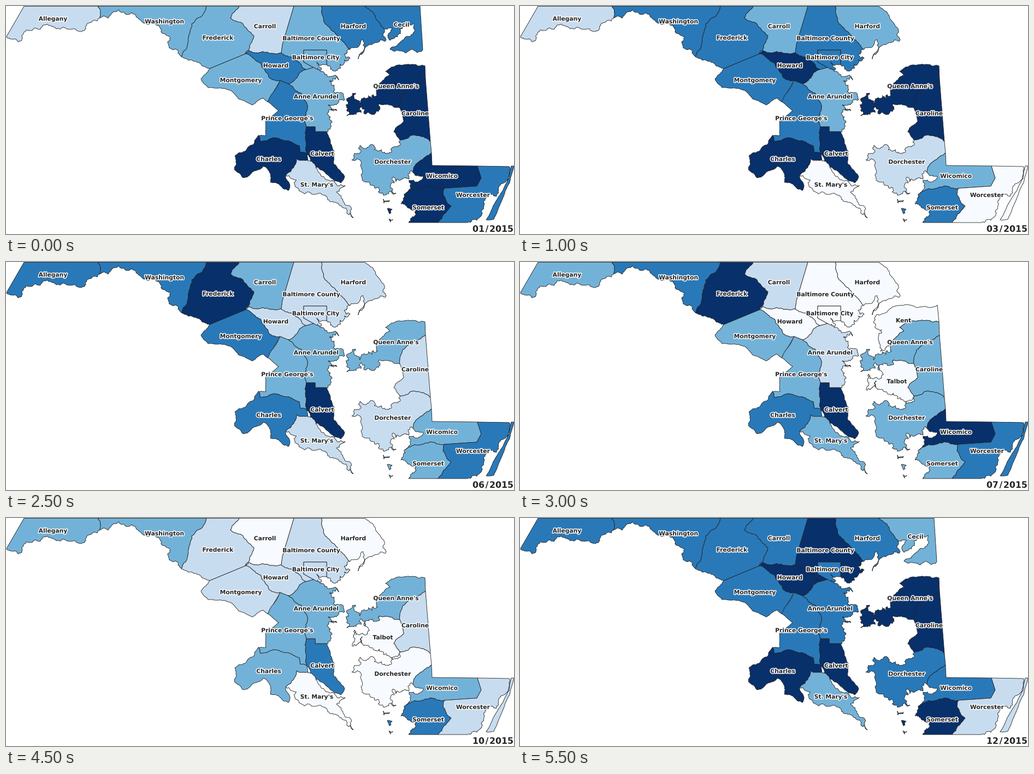
These frames come from a looping animation (930 by 419 pixels, 6 s). A matplotlib script:

```python
import numpy as np
import matplotlib.pyplot as plt
from matplotlib.animation import FuncAnimation
from matplotlib.patches import PathPatch
from matplotlib.path import Path
from matplotlib.patheffects import withStroke

W, H, DPI = 930, 419, 64
PT = 72 / DPI  # points per pixel
SHADES = ["#f7fbff", "#c8dcf0", "#73b2d8", "#2979b9", "#08306b"]
INK = "#232323"
STRAIGHT, BORDER, SHORE, COAST = 0, 0.12, 0.26, 0.4

fig = plt.figure(figsize=(W / DPI, H / DPI), dpi=DPI, facecolor="white")
ax = fig.add_axes([0, 0, 1, 1])
ax.set_xlim(0, W)
ax.set_ylim(H, 0)
ax.axis("off")

arcs = {}
counties = []


def arc(name, wobble, *coords):
    """Store a boundary through a few key points, roughened by midpoint displacement."""
    pts = np.reshape(np.array(coords, float), (-1, 2))
    rng = np.random.default_rng(len(arcs))
    step = np.diff(pts, axis=0)
    while wobble and np.hypot(*step.T).mean() > 2.5:
        normal = np.column_stack([-step[:, 1], step[:, 0]])
        mid = pts[:-1] + step / 2 + normal * rng.uniform(-wobble, wobble, (len(step), 1))
        fine = np.empty((len(pts) + len(mid), 2))
        fine[::2], fine[1::2] = pts, mid
        pts, step = fine, np.diff(fine, axis=0)
    arcs[name] = np.maximum(pts, 0.5)


def distance(a, b):
    return np.hypot(*(a - b))


def gap(point, line):
    return min(distance(point, line[0]), distance(point, line[-1]))


def ring(names):
    """Chain arcs end to end, flipping each as needed; straight lines bridge the gaps."""
    first, *rest = [arcs[n] for n in names.split()]
    if rest and gap(first[0], rest[0]) < gap(first[-1], rest[0]):
        first = first[::-1]
    chain = [first]
    for line in rest:
        end = chain[-1][-1]
        flip = distance(end, line[-1]) < distance(end, line[0])
        chain.append(line[::-1] if flip else line)
    return Path(np.vstack(chain + [first[:1]]), closed=True)


def county(name, x, y, levels, *rings):
    """levels holds one shade digit per month, '-' for no data."""
    shape = PathPatch(Path.make_compound_path(*map(ring, rings)),
                      ec=INK, lw=0.85 * PT, joinstyle="round")
    ax.add_patch(shape)
    label = ax.text(x, y + 4, name, ha="center", va="baseline", color=INK,
                    family="DejaVu Sans", weight="bold", size=10.75 * PT, zorder=5,
                    path_effects=[withStroke(linewidth=3 * PT, foreground="white")])
    counties.append((shape, label, levels))


# Western counties
arc("al_w", STRAIGHT, 168, 0, 33, 0, 1, 56)
arc("al_s", SHORE, 1, 56, 22, 66, 30, 53, 50, 42, 70, 35, 92, 42, 138, 47, 148, 34, 172, 22)
arc("al_wa", BORDER, 168, 0, 173, 10, 172, 22)
arc("wa_s", SHORE, 172, 22, 188, 22, 206, 7, 230, 12, 256, 32, 283, 42, 285, 49, 301, 58,
    296, 66, 304, 80, 321, 93)
arc("wa_fr", BORDER, 321, 93, 334, 58, 340, 33, 367, 0)
arc("fr_s", BORDER, 321, 93, 348, 102, 373, 115)
arc("fr_ca", BORDER, 438, 88, 454, 55, 433, 32, 411, 22, 427, 0)
arc("ho_top", BORDER, 438, 88, 445, 82, 478, 85, 504, 86)
arc("ba_ca", STRAIGHT, 504, 86, 506, 71, 527, 0)
arc("ho_ba", BORDER, 504, 86, 523, 94, 549, 117)
arc("ho_aa", BORDER, 549, 117, 528, 137, 517, 143)
arc("ho_mo", BORDER, 502, 137, 482, 132, 466, 105, 438, 88)
arc("mo_s", 0.07, 373, 115, 357, 134, 370, 150, 411, 155, 425, 170, 451, 182, 470, 169,
    479, 176)

# Around the upper bay
arc("city", STRAIGHT, 563, 113, 545, 103, 545, 81, 587, 81, 587, 108)
arc("city_coast", COAST, 563, 113, 578, 116, 569, 103, 587, 108)
arc("ba_coast", COAST, 587, 108, 604, 119, 612, 107, 630, 96, 620, 88, 629, 80)
arc("ba_ha", BORDER, 629, 80, 604, 52, 588, 36, 579, 16, 578, 0)
arc("ha_coast", SHORE, 629, 80, 654, 62, 645, 97, 661, 74, 694, 65, 692, 42)
arc("ha_ce", BORDER, 692, 42, 676, 18, 655, 0)
arc("ce_coast", SHORE, 692, 42, 707, 41, 703, 63, 747, 32, 728, 62, 703, 79, 763, 80)
arc("ce_e", STRAIGHT, 763, 80, 758, 0)
arc("aa_pg", BORDER, 517, 143, 540, 160, 551, 180, 550, 222)
arc("aa_cal", STRAIGHT, 550, 222, 566, 222, 566, 231, 587, 231)
arc("aa_coast", COAST, 587, 231, 596, 211, 588, 198, 606, 192, 590, 182, 608, 178,
    618, 163, 592, 138, 609, 136, 588, 127, 563, 113)

# Southern counties
arc("pg_w", 0.05, 462, 238, 476, 238, 475, 212, 499, 192, 479, 176, 502, 137)
arc("pg_ch", BORDER, 462, 238, 466, 249, 508, 247, 537, 257, 538, 268, 551, 272)
arc("pg_cal", BORDER, 551, 272, 548, 242, 550, 222)
arc("ch_coast", 0.15, 462, 238, 452, 255, 419, 276, 418, 300, 433, 315, 453, 304, 470, 295,
    484, 308, 484, 324, 517, 339, 512, 311)
arc("ch_st", BORDER, 512, 311, 527, 296, 532, 281, 553, 284)
arc("st_coast", SHORE, 512, 311, 537, 340, 578, 346, 598, 359, 624, 381, 636, 389,
    632, 371, 605, 342, 621, 330, 602, 322, 570, 300, 553, 284)
arc("cal_coast", BORDER, 587, 231, 600, 290, 620, 313, 613, 325, 600, 320, 560, 293,
    551, 272)

# Upper eastern shore
arc("ke_n", BORDER, 659, 97, 677, 86, 727, 84, 764, 79)
arc("ke_qa", BORDER, 767, 110, 744, 107, 706, 112, 695, 120, 703, 127, 676, 152)
arc("ke_w", COAST, 676, 152, 660, 164, 657, 146, 650, 118, 659, 97)
arc("qa_coast", COAST, 676, 152, 670, 170, 648, 180, 640, 160, 627, 176, 624, 202,
    650, 185, 668, 198, 684, 180)
arc("qa_ta", BORDER, 684, 180, 721, 187)
arc("qa_ca", BORDER, 721, 187, 726, 162, 747, 145, 768, 134)
arc("ca_do", BORDER, 777, 249, 764, 240, 741, 238, 721, 246)
arc("ca_ta", BORDER, 721, 246, 710, 231, 728, 212, 721, 187)
arc("ta_coast", COAST, 721, 246, 708, 262, 672, 240, 652, 218, 634, 235, 638, 206,
    662, 210, 684, 180)

# Lower eastern shore
arc("do_wi", BORDER, 779, 270, 763, 282, 751, 290, 745, 305)
arc("do_coast", COAST, 745, 305, 737, 318, 722, 320, 707, 316, 714, 344, 695, 347,
    672, 330, 633, 283, 648, 256, 680, 266, 706, 266, 721, 246)
arc("do_isle", COAST, 691, 355, 702, 357, 692, 362)
arc("wi_coast", SHORE, 745, 305, 764, 314, 738, 320, 731, 345)
arc("wi_so", BORDER, 731, 345, 767, 333, 803, 335)
arc("wi_wo", STRAIGHT, 803, 335, 862, 331, 870, 316, 863, 294)
arc("wi_n", STRAIGHT, 863, 294, 780, 293)
arc("so_wo", BORDER, 803, 335, 800, 347, 815, 368, 802, 382, 791, 398)
arc("so_coast", COAST, 737, 398, 751, 383, 723, 364, 731, 345)
arc("so_isle", COAST, 698, 372, 707, 374, 702, 382)
arc("so_islet", COAST, 701, 391, 708, 392, 704, 397)
arc("wo_coast", SHORE, 845, 398, 870, 378, 885, 346, 897, 350, 914, 324, 921, 295)
arc("wo_isle", 0.04, 925, 294, 930, 294, 922, 325, 893, 392, 879, 393, 898, 357, 919, 318)

county("Allegany", 86, 23, "121323234213", "al_w al_s al_wa")
county("Washington", 290, 28, "233333332213", "al_wa wa_s wa_fr")
county("Frederick", 388, 58, "233444421113", "wa_fr fr_s fr_ca")
county("Carroll", 474, 37, "122332110003", "fr_ca ho_top ba_ca")
county("Baltimore County", 559, 59, "223321011114", "ba_ca ho_ba city ba_coast ba_ha")
county("Harford", 636, 37, "332211000003", "ba_ha ha_coast ha_ce")
county("Cecil", 724, 34, "3----------2", "ha_ce ce_coast ce_e")
county("Baltimore City", 567, 94, "223321011113", "city city_coast")
county("Howard", 494, 109, "344321011114", "ho_top ho_ba ho_aa ho_mo")
county("Montgomery", 430, 136, "233333221113", "ho_mo mo_s")
county("Anne Arundel", 568, 166, "222222122213", "ho_aa aa_pg aa_cal aa_coast")
county("Prince George's", 515, 206, "333212222213", "aa_pg pg_cal pg_ch pg_w")
county("Charles", 481, 281, "444323333214", "pg_ch ch_coast ch_st")
county("Calvert", 579, 271, "444434444324", "aa_cal cal_coast pg_cal")
county("St. Mary's", 569, 328, "100001210002", "ch_st st_coast")
county("Kent", 702, 107, "------0-----", "ke_n ke_qa ke_w")
county("Queen Anne's", 714, 147, "444312222214", "ke_qa qa_coast qa_ta qa_ca")
county("Caroline", 749, 197, "444201210124", "ca_ta qa_ca ca_do")
county("Talbot", 690, 219, "------00000-", "qa_ta ca_ta ta_coast")
county("Dorchester", 708, 286, "211101210003", "ca_do do_wi do_coast", "do_isle")
county("Wicomico", 798, 312, "432102420233", "do_wi wi_coast wi_so wi_wo wi_n")
county("Somerset", 773, 370, "443212221344", "wi_so so_wo so_coast", "so_isle", "so_islet")
county("Worcester", 855, 347, "300013301131", "wi_wo so_wo wo_coast", "wo_isle")

date = ax.text(853.5, 415, "", va="baseline", color=INK, family="DejaVu Sans",
               weight="bold", size=15.8 * PT, zorder=6)


def draw(month):
    for shape, label, levels in counties:
        level = levels[month]
        shown = level != "-"
        shape.set_visible(shown)
        label.set_visible(shown)
        if shown:
            shape.set_facecolor(SHADES[int(level)])
    date.set_text(f"{month + 1:02}\u200a/\u200a2015")


anim = FuncAnimation(fig, draw, frames=12, interval=500, repeat=True, repeat_delay=0)
plt.show()
```
